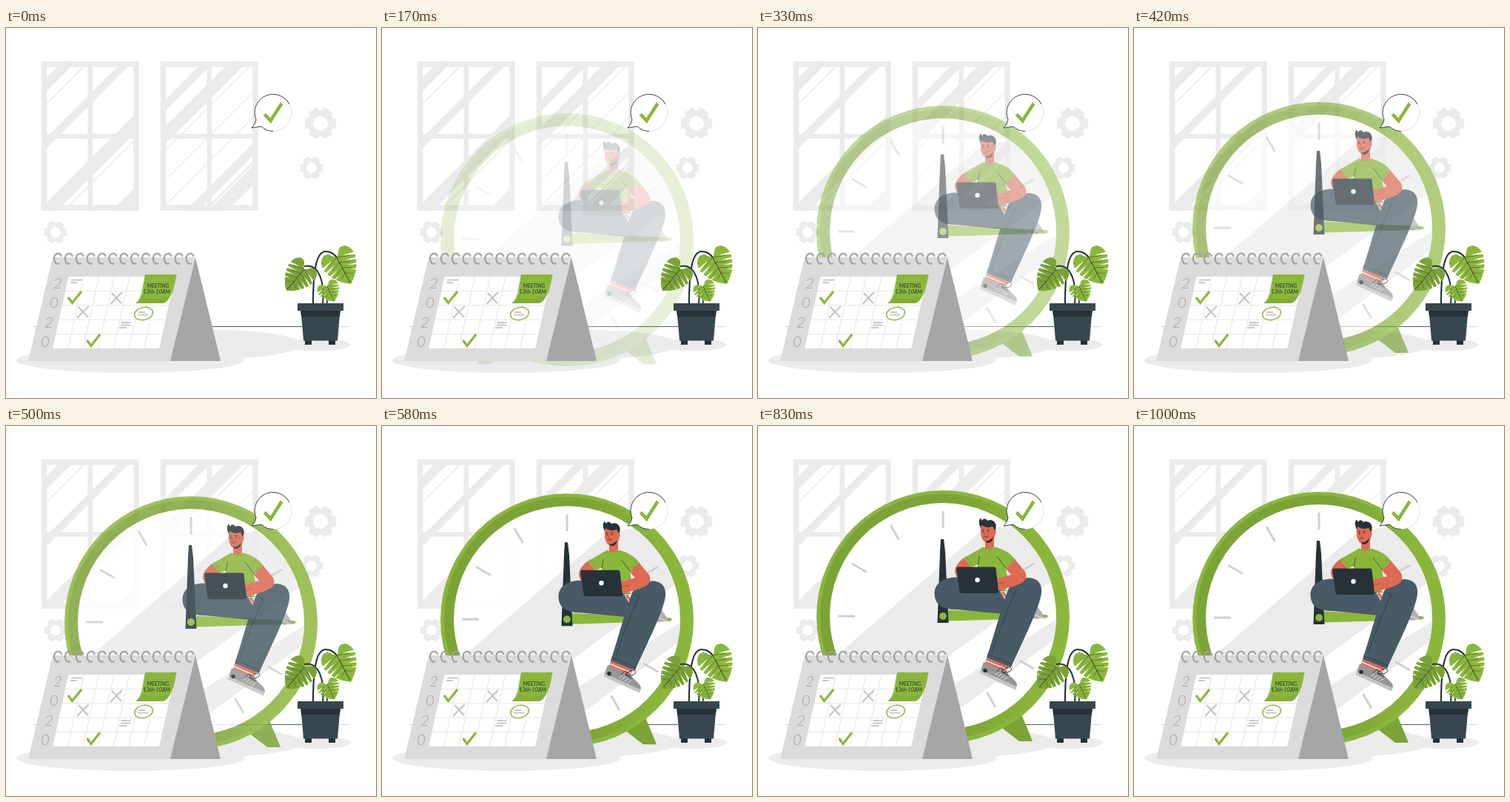
These frames come from a looping animation (500x500 px, 1.04 s). An HTML page:

```html
<!DOCTYPE html>
<html lang="en">
<head>
<meta charset="utf-8">
<title>Meeting schedule</title>
<style>
html, body { margin: 0; width: 100%; height: 100%; overflow: hidden; background: #fff; }
svg { display: block; width: 100vw; height: 100vh; }
text { font-family: Lato, "Open Sans", sans-serif; font-style: italic; }
</style>
</head>
<body>
<svg id="stage" viewBox="0 0 500 500" xmlns="http://www.w3.org/2000/svg"></svg>
<script>
const GREEN = '#8bb63c', DEEP = '#7ca337', DARK = '#263238', SLATE = '#37474f';
const PANTS = '#475a65', SKIN = '#de6a53', PALE = '#ebebeb';

const fill = (d, c, more = '') => `<path d="${d}" fill="${c}" ${more}/>`;
const line = (d, c, w = 1, more = '') =>
  `<path d="${d}" fill="none" stroke="${c}" stroke-width="${w}" ${more}/>`;
const rect = (x, y, w, h, c) => `<rect x="${x}" y="${y}" width="${w}" height="${h}" fill="${c}"/>`;
const disc = (x, y, r, c) => `<circle cx="${x}" cy="${y}" r="${r}" fill="${c}"/>`;
const oval = (x, y, rx, ry, c) => `<ellipse cx="${x}" cy="${y}" rx="${rx}" ry="${ry}" fill="${c}"/>`;
const times = (n, f) => Array.from({ length: n }, (_, i) => f(i)).join('');

// Each glint is a 45 degree strip between two values of x + y.
function windowFrame(x, glints) {
  const id = 'pane' + x, top = 45, h = 202;
  const strips = glints.map(([a, b]) =>
    fill(`M${a - 40} 40L${b - 40} 40L${b - 250} 250L${a - 250} 250Z`, PALE)).join('');
  return `<clipPath id="${id}"><rect x="${x}" y="${top}" width="131" height="${h}"/></clipPath>
    <g clip-path="url(#${id})">${strips}</g>` +
    `<rect x="${x + 3.5}" y="${top + 4}" width="124.5" height="${h - 8}" fill="none" stroke="${PALE}" stroke-width="7.5"/>` +
    rect(x + 62.5, top, 6.5, h, PALE) + rect(x, 143, 131, 6.5, PALE);
}

function gear(x, y, r, hole) {
  const teeth = 6, pts = [];
  for (let i = 0; i < teeth; i++) {
    const a = i * 2 * Math.PI / teeth;
    for (const [da, k] of [[-.4, .8], [-.29, 1], [.29, 1], [.4, .8]]) {
      pts.push((x + r * k * Math.cos(a + da)).toFixed(1) + ' ' + (y + r * k * Math.sin(a + da)).toFixed(1));
    }
  }
  return fill(`M${pts.join('L')}Z`, PALE) + disc(x, y, r * .8, PALE) + disc(x, y, hole, '#fff');
}

function clock() {
  const foot = 'M331 409L320 400L352 380L371 426H353Z';
  const ticks = times(12, i =>
    `<path d="M250 115V138" stroke="#cfcfcf" stroke-width="3" transform="rotate(${i * 30} 250 257)"/>`);
  return `<linearGradient id="rim"><stop offset=".55" stop-color="${DEEP}"/><stop offset=".9" stop-color="${GREEN}"/></linearGradient>` +
    fill(foot, DEEP) + `<g transform="matrix(-1 0 0 1 500 0)">${fill(foot, DEEP)}</g>` +
    disc(250, 258, 171, GREEN) + disc(250, 257.500, 166, 'url(#rim)') + disc(250, 257, 153, '#fff') +
    '<clipPath id="face"><circle cx="250" cy="257" r="153"/></clipPath><g clip-path="url(#face)">' +
    fill('M303 141L90 324L160 385L256 312L410 200L360 130Z', PALE) +
    fill('M410 257L200 390L240 406L410 281Z', PALE) + '</g>' + ticks +
    fill('M257 248.500L389 255Q394 257.500 389 259.500L257 263.500Z', GREEN) +
    fill('M331 252.500L385 255.500V258.500L331 260.500Z', DEEP) +
    fill('M247 153H251L253 170L257.500 266H242.500L246 170Z', DARK) +
    disc(250, 257, 5, GREEN);
}

function man() {
  const shoe = fill('M305 319L336 332C340 339 350 344 350 350L348 356L300 334Z', '#969696') +
    fill('M301 330L349.500 352L347.500 356.500L300 334Z', '#c4c4c4') + disc(307, 330.500, 2.800, DARK) +
    times(4, i => line(`M${320 + i * 4} ${336 + i * 2.200}l5-3`, '#e0e0e0', 1)) +
    line('M323 332C328 324 334 327 329 332C336 324 345 325 342 330C339 334 333 333 329 332L338 337', DARK, 1);
  const farFoot = fill('M366 238L375 240L386 256Q387 260 381 260L374 261Z', '#b0b0b0') +
    line('M372 254L385 260', '#d5d5d5', 1.5);
  const farLeg = fill('M276 205C252 202 238 212 238.500 227C239 242 250 248 268 248L332 254L350 228L320 215Z', PANTS);
  const torso = fill('M307 150V166L313 170L319 163V148Z', SKIN) +
    fill('M304 163.500Q312 168 321 163.500Q340 169 348 181L335 193L337 203L335 222H297V187L289 191L277 179Z', GREEN) +
    line('M299.500 176L297 188M323 176L335 192', DARK, .7) +
    line('M304 164Q313 169 321 164M336 188L345 179M280 176L290 186', DEEP, 1);
  const head = fill('M301 135C300 147 302 157 310 157.500C318 158 322 150 321 137L313 130Z', SKIN) +
    fill('M307 155.500Q312 156 318 150Q317 157 311 158Q308 157.500 307 155.500Z', DARK) +
    fill('M301 138C298 132 298 127 301 124.500L303 128C305 123 309 126 310 128C316 125 322 130 321.500 135Q322 139 320 141L317 135.500Q309 139 302 134Z', DARK) +
    disc(304.500, 143, .9, DARK) + disc(311, 142.500, .9, DARK) +
    line('M302.500 140.500l3-.8M309 140l3.500.2', DARK, .9) +
    line('M307 143L305.500 147H307.500', '#a84838', .7) + line('M305 149.500Q308 151.500 311 148.500', DARK, .7) +
    disc(319.500, 144, 2.200, SKIN);
  const arms = fill('M277.500 178.500Q266 188 266 196Q266 203 273 209L284 200L278 196L289 191Z', SKIN) +
    fill('M347 180L361 197Q365 205 358 211C350 216 335 220 322 222L320 207L342 201L335 193Z', SKIN) +
    line('M324 213L334 211', '#a84838', .7);
  const nearLeg = fill('M338 221C343 213 352 206 366 205C379 206 384 214 383 225C382 244 352 302 342 326L309 313C319 283 327 251 338 221Z', PANTS) +
    line('M348 223C336 252 324 281 316 306', DARK, .6) +
    line('M310 308L343 322', DARK, .6) + line('M341 222L350 231', DARK, .7);
  const ankles = fill('M309 313L339 324L335 333L307 320Z', SKIN) +
    line('M308 317L336 329', '#f1e9e5', 1.600);
  const hem = fill('M326 223L342 222L336 240Z', '#e4e4e4') + line('M330 224L338 234', SKIN, 3) +
    line('M326 222L336 239', DARK, .8);
  const laptop = fill('M269.500 190.500H319Q321 190.500 321.500 192.500L325 223Q325 226 322 226H276Q273 226 272.500 223L268 193Q268 190.500 269.500 190.500Z', DARK) +
    disc(296.500, 208, 3.200, '#fff');
  return farFoot + farLeg + ankles + shoe + torso + head + hem + nearLeg + arms + laptop;
}

function calendar() {
  const at = (u, v) => `${(84.5 + 144 * u - 21.5 * v).toFixed(1)} ${(336 + 97 * v).toFixed(1)}`;
  const cross = (x, y) => line(`M${x - 8} ${y + 8}L${x + 8} ${y - 8}M${x - 6} ${y - 7}L${x + 7} ${y + 7}`, '#c7c7c7', 2.4);
  const digits = [[70, 352], [65, 378], [58, 405], [53, 431]].map(([x, y], i) =>
    `<text x="${x}" y="${y}" font-size="20.500" font-weight="300" text-anchor="middle" fill="#a3a3a3">${i % 2 ? 0 : 2}</text>`).join('');
  const rings = times(13, i => line('M75 309C74 303 66 303 65 311C65 317 68 320 72 318', '#a0a0a0', 2.1,
    `transform="translate(${i * 14.87})"`));
  return fill('M63 310H256L222 450H30Z', '#dbdbdb') + fill('M256 310L290 450H222Z', '#a6a6a6') +
    fill(`M${at(0, 0)}L${at(1, 0)}L${at(1, 1)}L${at(0, 1)}Z`, '#fff') +
    times(6, i => line(`M${at((i + 1) / 7, 0)}L${at((i + 1) / 7, 1)}`, '#e2e2e2', .9)) +
    times(4, i => line(`M${at(0, (i + 1) / 5)}L${at(1, (i + 1) / 5)}`, '#e2e2e2', .9)) +
    digits + rings +
    line('M88 340.500H103M87 344H96M156 398H168.500M155 401.500H168M153 405H163M179 384H188M178 387.500H192', '#c7c7c7', 2) +
    line('M84 364L89.500 371.500L102 356M109.500 422L115 429.500L127 414', GREEN, 3.2) +
    cross(104, 384) + cross(149, 365) +
    `<ellipse cx="186" cy="386" rx="12.500" ry="8.500" fill="none" stroke="${GREEN}" stroke-width="1.300" transform="rotate(-12 186 386)"/>` +
    fill('M188 333H230.500C228 346 226 359 219 367Q215 372 210 372H175Q183 367 185 350Z', GREEN) +
    fill('M175 372Q183 369 185 362Q199 370 222 362Q218 372 210 372Z', DEEP, 'opacity=".5"') +
    `<g font-size="7.200" fill="${DARK}" text-anchor="middle"><text x="205.500" y="351">MEETING</text><text x="203.500" y="359">13th-10AM</text></g>`;
}

function leaf(id, x, y, turn, len, wide, color) {
  const shape = 'M0 0C-.08-.1-.16-.12-.22-.18C-.36-.42 0-.62 .3-.52C.65-.42 .85-.2 1 0C.85 .2 .65 .42 .3 .52C0 .62-.36 .42-.22 .18C-.16 .12-.08 .1 0 0Z';
  const both = f => f(-1) + f(1);
  const slots = both(s => times(4, i => {
    const a = .02 + i * .18;
    return fill(`M${a} ${s * .18}L${a + .12} ${s * .7}L${a + .24} ${s * .68}Z`, '#000');
  }));
  const veins = both(s => times(4, i => line(`M${i * .19} 0L${i * .19 + .14} ${s * (.38 - i * .06)}`, DARK, .01)));
  return `<g transform="translate(${x} ${y}) rotate(${turn}) scale(${len} ${wide})">
    <mask id="${id}" maskUnits="userSpaceOnUse" x="-1" y="-1" width="3" height="2">${fill(shape, '#fff')}${slots}</mask>
    <g mask="url(#${id})">${fill(shape, color)}${veins}${line('M0 0H.93', DARK, .02)}</g></g>`;
}

function plant() {
  return line('M415 374C415 333 418 302 432 302Q441 302 447 310', DARK, 2.2) +
    line('M428 374C431 343 423 318 403 322', DARK, 2) +
    line('M434 374Q434 359 432 349', DARK, 1.6) +
    leaf('leafA', 447, 310, 62, 41, 44, GREEN) +
    leaf('leafB', 403, 326, 130, 38, 38, DEEP) +
    leaf('leafC', 434, 349, 65, 23, 28, GREEN) +
    rect(404, 421, 9, 7, DARK) + rect(436, 421, 9, 7, DARK) +
    fill('M398.500 382H451.500L448 422.500H402Z', SLATE) +
    fill('M398 381H452L451 390H399Z', DARK) + rect(394, 372, 62, 10, SLATE);
}

function bubble() {
  const left = 'A25 25 0 0 0 336 114.500Q336 119 338 124Q337 130 332 135L345 133Q352 139.500 361 139.500';
  return fill(`M386 114.500A25 25 0 0 0 361 89.500${left}A25 25 0 0 0 386 114.500Z`, '#fff') +
    line('M361 139.500A25 25 0 0 0 386 114.500A25 25 0 0 0 361 89.500', '#c0c0c0', .5) +
    line(`M383 103A25 25 0 0 0 361 89.500${left}`, DARK, .9) +
    line('M349.500 116.500L357.500 125.500L372.500 102', GREEN, 4.6);
}

document.getElementById('stage').innerHTML =
  windowFrame(48, [[122, 140], [156, 158.5], [203, 217], [291, 316], [324, 326.5], [390, 420]]) +
  windowFrame(209, [[312, 327], [348, 372], [380, 382], [420, 421.5], [454, 456], [490, 506], [514, 518], [520, 546]]) +
  gear(425, 129, 22, 10) + gear(413, 189, 16, 7) + gear(67, 276, 16, 7) +
  oval(168, 449, 154, 17, PALE) + oval(270, 427.5, 130, 20, PALE) + oval(421, 428, 45, 8, PALE) +
  line('M37 403.500H272M452 403.500H463', DARK, .4, 'opacity=".5"') + line('M272 403.500H400', DARK, .8) +
  `<g id="clock">${clock()}</g><g id="man">${man()}</g>` +
  calendar() + plant() + bubble();

// Rise of the clock and the man: [ms, px below the highest point].
const RISE = [[0, 38], [83, 33.5], [250, 23], [333, 18], [500, 8], [583, 4.2], [667, 1.6], [750, .3], [833, 0], [917, .6], [1000, 2], [1040, 3]];
const LOOP = 1040, TICK = 1000 / 24;
const movers = ['clock', 'man'].map(id => document.getElementById(id));

function riseAt(t) {
  const i = Math.max(1, RISE.findIndex(([at]) => at >= t));
  const [t0, y0] = RISE[i - 1], [t1, y1] = RISE[i];
  return y0 + (y1 - y0) * (t - t0) / (t1 - t0);
}

function draw(now) {
  const t = Math.floor((now % LOOP + 6) / TICK) * TICK;
  const shown = Math.min(1, Math.max(0, (t - 62) / 523));
  const y = riseAt(Math.min(t, LOOP)).toFixed(2);
  for (const g of movers) {
    g.setAttribute('transform', `translate(0 ${y})`);
    g.setAttribute('opacity', t < 80 ? 0 : shown.toFixed(3));
  }
}

const start = performance.now();
function loop() {
  draw(performance.now() - start);
  requestAnimationFrame(loop);
}
loop();
</script>
</body>
</html>
```
